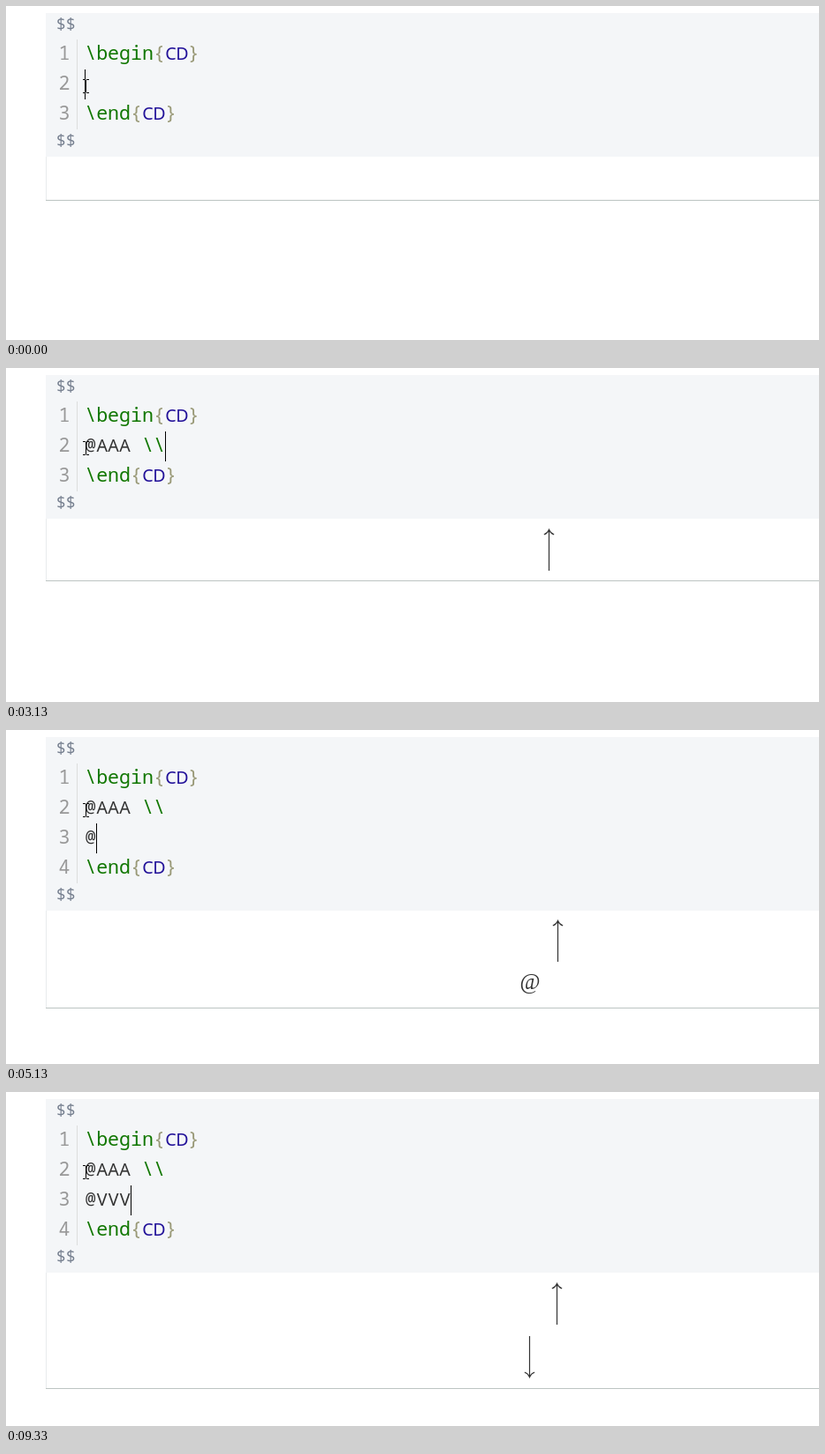
An HTML page with a canvas that plays this animation: 920 by 379 pixels, repeating every 9.86 s.

```html
<!DOCTYPE html>
<html lang="en">
<head>
<meta charset="utf-8">
<title>Commutative diagram editor</title>
<style>
  html, body { margin: 0; width: 100%; height: 100%; overflow: hidden; background: #fff; }
  canvas { display: block; width: 920px; height: 379px; }
</style>
</head>
<body>
<canvas id="stage" width="920" height="379"></canvas>
<script>
const ctx = document.getElementById('stage').getContext('2d');
const LOOP = 9860, ROW = 34, CELL = 12.96, LEFT = 89.2, CENTER = 614;
const INK = '#333', GREEN = '#170', BRACE = '#997', ATOM = '#219';
const AAA = '@AAA \\\\';

// [start ms, second line, third line (null: absent), caret visible]
const steps = [
  [0, '', null, 1], [400, '', null, 0],
  [930, '@', null, 1], [1400, '@', null, 0],
  [1930, '@A', null, 1], [2130, '@AA', null, 1], [2270, '@AAA', null, 1],
  [2730, '@AAA ', null, 1], [2930, '@AAA \\', null, 1], [3130, AAA, null, 1],
  [3270, AAA, '', 1], [3470, AAA, '@', 1], [3800, AAA, '', 1], [3930, AAA, null, 1],
  [4270, AAA, '', 1], [4800, AAA, '', 0],
  [5130, AAA, '@', 1], [5670, AAA, '@', 0],
  [5870, AAA, '@v', 1], [6070, AAA, '@vv', 1], [6400, AAA, '@vvv', 1],
  [6800, AAA, '@vv', 1], [6930, AAA, '@v', 1], [7270, AAA, '@', 1],
  [7730, AAA, '@V', 1], [8000, AAA, '@VV', 1],
  [8270, AAA, '@VVV', 1], [8800, AAA, '@VVV', 0], [9330, AAA, '@VVV', 1]
];

function rect(x, y, w, h, color) {
  ctx.fillStyle = color;
  ctx.fillRect(x, y, w, h);
}

function text(str, x, y, font, color) {
  ctx.font = font;
  ctx.fillStyle = color;
  ctx.fillText(str, x, y);
}

// Monospaced code; each character sits in the middle of its cell.
function code(str, col, y, color) {
  [...str].forEach((ch, i) => {
    const font = /[A-Z]/.test(ch) ? '19.6px "Noto Sans", sans-serif'
      : ch === '@' ? '19px "Noto Sans Mono", monospace'
      : '21.6px "Noto Sans Mono", monospace';
    text(ch, LEFT + (col + i + 0.5) * CELL, ch === '@' ? y - 1 : y, font, color);
  });
}

function command(name, y) {
  const n = name.length;
  code(name, 0, y, GREEN);
  code('{', n, y, BRACE);
  code('CD', n + 1, y, ATOM);
  code('}', n + 3, y, BRACE);
}

function dollars(y) {
  for (const x of [62.3, 73.3]) text('$', x, y, '18.4px "Noto Sans Mono", monospace', '#778090');
}

function arrow(x, tip, dir) {
  ctx.save();
  ctx.translate(x + 0.5, tip);
  ctx.scale(1, dir);
  ctx.strokeStyle = INK;
  ctx.lineWidth = 1.2;
  ctx.beginPath();
  ctx.moveTo(0, 0.5);
  ctx.lineTo(0, 47);
  ctx.moveTo(-5.7, 6);
  ctx.quadraticCurveTo(-1.5, 4.5, 0, 0.5);
  ctx.quadraticCurveTo(1.5, 4.5, 5.7, 6);
  ctx.stroke();
  ctx.restore();
}

function math(str, x, y) {
  const start = x - (19.5 + 13 * (str.length - 1)) / 2;
  text('@', start + 9.7, y - 3, '25px "Liberation Serif", serif', INK);
  for (let i = 1; i < str.length; i++) {
    text(str[i], start + 13 * (i + 1), y, 'italic 28px "Liberation Serif", serif', INK);
  }
}

function error(letter, y) {
  ctx.strokeStyle = '#ee2038';
  ctx.lineWidth = 1;
  ctx.strokeRect(511.5, y + 0.5, 206, 31);
  text(`Couldn't find ${letter} for @${letter}`, CENTER, y + 23,
    '19.5px "Open Sans", sans-serif', '#f00');
}

// Draws the rendered formula and returns the bottom row of its panel.
function preview(two, three) {
  if (three === null) {
    if (two === '') return 220;
    if (two === '@') { math('@', CENTER, 205); return 223; }
    if (two.length < 4) { error('A', 183); return 226; }
    arrow(CENTER, 183, 1);
    return 241;
  }
  if (three === '') { arrow(CENTER, 217, 1); return 275; }
  if (three === '@VVV') {
    arrow(623, 217, 1);
    arrow(592, 324, -1);
    return 336;
  }
  if (three[1] === 'V') { error('V', 217); return 260; }
  arrow(Math.round(624 + 6.8 * (three.length - 1)), 216, 1);
  math(three, 593, 297);
  return 315;
}

function pointer() {
  rect(90, 84, 1, 14, '#000');
  for (const y of [83, 98]) {
    rect(87, y, 3, 1, '#000');
    rect(91, y, 3, 1, '#000');
  }
}

function draw(time) {
  const [, two, three, caret] = steps.findLast(s => s[0] <= time);
  const rows = three === null ? 3 : 4;
  const bottom = 69 + rows * ROW;
  const line = three === null ? two : three;

  rect(0, 0, 920, 379, '#fff');
  ctx.textAlign = 'center';
  ctx.textBaseline = 'alphabetic';
  rect(45, 8, 875, bottom - 8, '#f4f6f8');
  rect(80, 38, 1, rows * ROW, '#ddd');
  dollars(27);
  dollars(bottom - 12);

  for (let i = 0; i < rows; i++) {
    text(i + 1, 66, 61 + i * ROW, '21.6px "Noto Sans Mono", monospace', '#999');
  }
  command('\\begin', 61);
  code(two.slice(0, 4), 0, 95, INK);
  code(two.slice(4), 4, 95, GREEN);
  if (three) code(three, 0, 129, INK);
  command('\\end', 61 + (rows - 1) * ROW);

  const end = preview(two, three);
  rect(45, bottom, 1, end - bottom, '#e8ebec');
  rect(45, end, 875, 1, '#bcc4c2');

  if (caret) rect(Math.round(LEFT + line.length * CELL), 38 + (rows - 2) * ROW, 1, ROW, '#000');
  pointer();
}

const origin = performance.now();
function tick() {
  draw((performance.now() - origin) % LOOP);
  requestAnimationFrame(tick);
}
tick();
</script>
</body>
</html>
```
